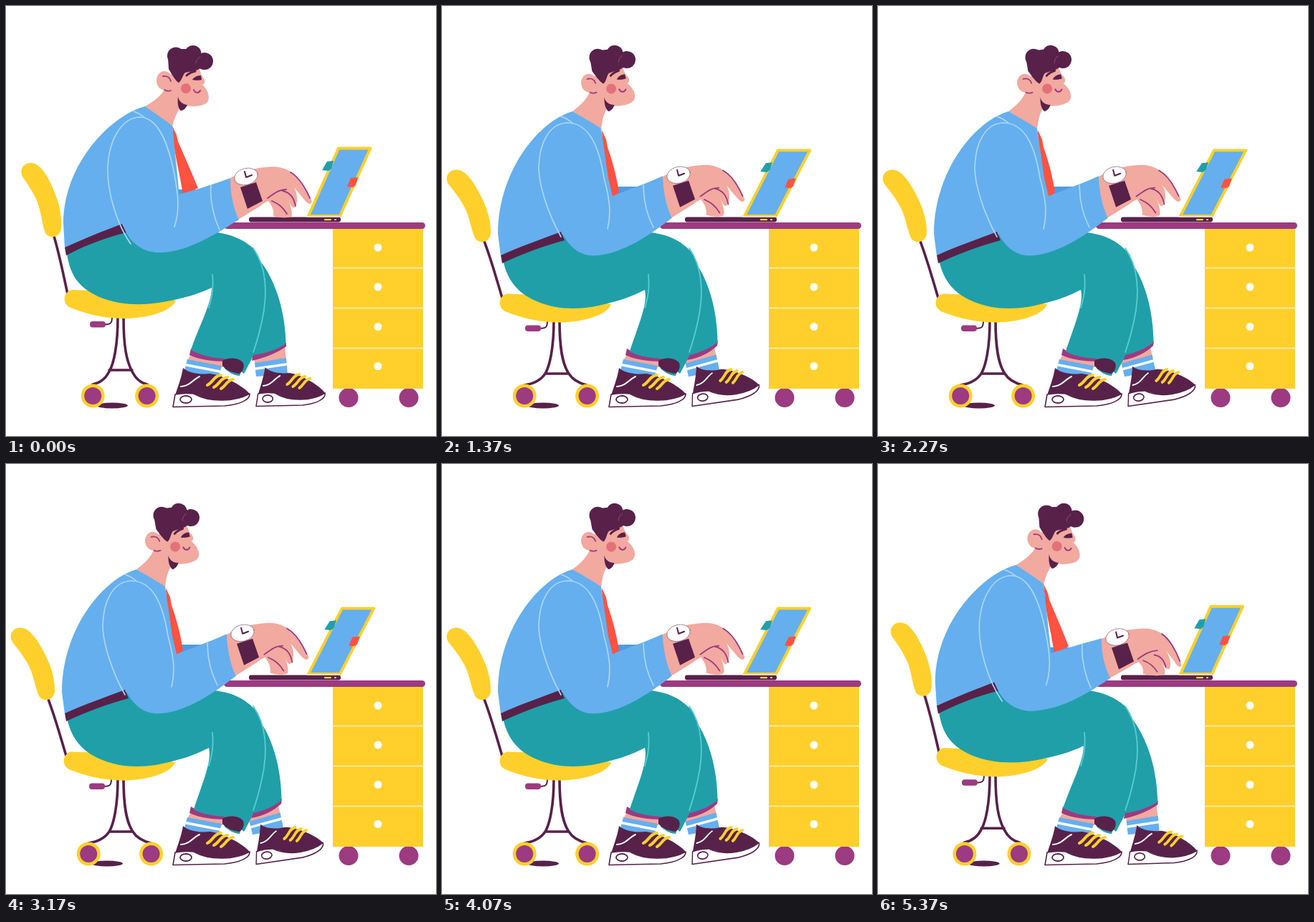
Animation, 600 px wide and 600 px high, one loop 5410 ms. Source, as an HTML page:

```html
<!DOCTYPE html>
<html lang="en">
<head>
<meta charset="utf-8">
<title>Typing at the desk</title>
<style>
html, body { margin: 0; width: 100%; height: 100%; overflow: hidden; background: #fff; }
svg { display: block; width: 100vw; height: 100vh; }
</style>
</head>
<body>
<svg id="stage" viewBox="0 0 600 600" stroke-linecap="round" stroke-linejoin="round"></svg>
<script>
const BLUE = '#65afee', TEAL = '#209fa9', YELLOW = '#ffd02b', DARK = '#58214a', PURPLE = '#9c3a82',
  SKIN = '#f2a99f', RED = '#ff5240', PALE = '#a9d5fa', MINT = '#58cdd1', WHITE = '#fff';
const LOOP = 5410, CYCLE = 27; // ms, steps of one sway
const stage = document.getElementById('stage');

const fill = (d, c, extra = '') => `<path d="${d}" fill="${c}" ${extra}/>`;
const line = (d, c, w) => `<path d="${d}" fill="none" stroke="${c}" stroke-width="${w}"/>`;
const dot = (x, y, r, c) => `<circle cx="${x}" cy="${y}" r="${r}" fill="${c}"/>`;
const oval = (x, y, rx, ry, c, extra = '') => `<ellipse cx="${x}" cy="${y}" rx="${rx}" ry="${ry}" fill="${c}" ${extra}/>`;
const bar = (x, y, w, h, r, c) => `<rect x="${x}" y="${y}" width="${w}" height="${h}" rx="${r}" fill="${c}"/>`;
const group = (transform, ...parts) => `<g transform="${transform}">${parts.join('')}</g>`;

// Blends two paths of the same structure; t may run past 0..1.
function mix(a, b, t) {
  const to = b.match(/-?[\d.]+/g);
  let i = 0;
  return a.replace(/-?[\d.]+/g, n => (+n + (to[i++] - n) * t).toFixed(2));
}

// Cosine wave peaking at step `peak`, scaled to 0 at step 0 and 1 at step `end`.
function wave(p, peak, end, turns = 1) {
  const c = s => Math.cos((s - peak) * turns * 2 * Math.PI / CYCLE);
  return (c(0) - c(p)) / (c(0) - c(end));
}

const shoe = fill('M247 505C252 510 265 515 285 513C305 516 330 530 339 540C341 546 330 552 312 553C290 553 275 546 262 541C250 541 240 542 236 543C240 531 245 518 247 505Z', DARK) +
  fill('M236 542C245 540 254 540 262 541C285 554 320 552 340 541C341 550 325 556 305 558L233 559.5Z', WHITE, `stroke="${DARK}" stroke-width="1.6"`) +
  oval(251, 549, 8, 5, WHITE, `stroke="${DARK}" stroke-width="1.8"`) +
  line('M244 531C257 530 261 521 270 517', WHITE, 2) +
  line('M300 515C290 516 289 525 281 529M309 518C299 519 298 528 290 532M317 521C308 522 307 530 300 534', YELLOW, 4);

const desk = dot(478, 546.5, 13.5, PURPLE) + dot(562, 546.5, 13.5, PURPLE) +
  bar(456, 308, 126, 226, 0, YELLOW) +
  line('M456 365.5H582M456 421.5H582M456 477.5H582', '#fdea9f', 2) +
  [337, 392, 447.5, 502.5].map(y => dot(519, y, 5.5, WHITE)).join('') +
  bar(304, 302, 281, 9, 4.5, PURPLE);

const nearFoot = fill('M260 482L310 490L302 504L253 495Z', SKIN) +
  fill('M253 493L301 502L297 516L248 512Z', BLUE) +
  line('M252 501L298 510', WHITE, 3.5) + shoe;

const head = oval(221, 104, 11, 13, SKIN) +
  fill('M228 96L268 82L273 97C279 104 278 108 274 110C282 117 286 129 280 135C272 142 254 140 242 138L222 118Z', SKIN) +
  line('M219 98C225 97 229 100 230 105M221 117C224 119 227 119 230 118', PURPLE, 1.8) +
  fill('M226 72L227 88C232 96 236 104 241 107C246 103 246 97 250 93C258 91 266 91 271 87L284 80L264 60L240 60Z', DARK) +
  dot(237, 69.5, 12, DARK) + dot(261, 66.5, 11.5, DARK) + dot(277, 77, 12, DARK) +
  line('M252 97C255 94 259 92 264 91', DARK, 3) +
  line('M271 71C267 73 265 76 265 80', '#8b4674', 1) +
  fill('M260 103C263 98 268 97 272 97L273 103C269 104 264 104 260 103Z', DARK) +
  line('M262 117C264 122 269 122 271 118', PURPLE, 2) +
  dot(251, 115, 7, '#e4717a') +
  fill('M240 126C241 133 246 137 253 138C251 143 247 146 244 146C240 143 239 135 240 126Z', DARK);

function chair(seat, lean) {
  const left = 121.2 - 6 * seat, right = 196.6 + 6 * seat;
  const legs = mix(
    'M156 434C156 475 150 500 144 510C139 520 131 526 121 528M164 434C164 475 168 495 176 510C181 520 188 526 197 528M144 508L176 508',
    'M156 439C156 478 150 503 144 513C138 522 128 527 115 529M164 439C164 478 168 500 177 513C182 521 190 526 202 529M144 513L177 513', seat);
  return oval(148 - 7 * seat, 557.5, 22, 4, DARK) +
    line(legs, DARK, 3.6) +
    [left, right].map(x => dot(x, 544, 16.5, YELLOW) + dot(x, 544, 12, PURPLE)).join('') +
    group(`translate(${-2 * lean} ${5 * lean}) rotate(${-4.3 * lean} 87 403)`,
      line('M66 318C75 348 80 375 86 402', DARK, 3.6),
      fill('M23 238C18 228 25 219 34 219C44 219 50 226 58 239C70 262 79 286 77 310C76 323 61 326 55 317C51 308 50 294 46 280C41 264 31 250 23 238Z', YELLOW)) +
    group(`translate(${-seat} ${5.5 * seat})`,
      line('M138 444C146 445 148 442 148 434', DARK, 2),
      bar(117, 440, 22, 8.5, 4, PURPLE),
      fill('M92 396C79 399 78 416 90 421C115 431 140 436 165 436C195 436 230 427 237 411L200 400Z', YELLOW));
}

function farLeg(seat) {
  return group(`rotate(${-7 * seat} 349 558)`,
      fill('M346 484L389 474L391 494L347 499Z', SKIN),
      fill('M347 498L391 491L393 514L349 517Z', BLUE),
      line('M349 506L391 500', WHITE, 3.5),
      group('translate(139.3 -1) scale(.9 1)', shoe)) +
    fill(mix('M391 470L345 484L343 495C362 491 380 483 391 475Z', 'M385 467L345 482L342 494C360 491 375 483 384 474Z', seat), PURPLE) +
    fill(mix('M300 319C342 325 388 380 390.5 471C380 479 362 485 345 487L290 400Z',
      'M300 320C342 326 383 380 384.5 469C375 477 360 484 345 487L290 400Z', seat), TEAL);
}

function nearLeg(seat) {
  return fill('M258 478C275 489 295 491 312 491L306 496C288 496 268 493 256 487Z', PURPLE) +
    fill(mix(
      'M84 338C88 375 100 392 130 406C165 420 200 418 235 410C255 406 275 399 287 393C287 415 270 445 258 480C275 489 290 491 305 492L332 513C342 495 350 480 355 460C367 425 368 375 345 338C329 324 313 319 295 316L166 306Z',
      'M84 349C90 383 105 400 132 412C165 426 200 424 235 414C255 409 270 403 283 396C288 415 272 450 262 482C275 489 290 491 305 492L332 513C342 495 350 480 355 460C367 425 368 375 347 342C329 324 313 319 291 316L170 317Z', seat), TEAL) +
    fill('M305 500L330 505L326 516C318 516 311 511 305 506Z', TEAL) +
    fill('M302 495C309 490 325 490 331 498C333 505 330 511 325 513C317 512 308 509 302 502Z', DARK) +
    line('M288 375C290 395 287 407 283 421M345 338C363 363 366 400 357 440C353 458 349 472 345 483', MINT, 1.8);
}

function torso(sway, seat) {
  const m = (a, b) => mix(a, b, sway);
  return fill(m('M236 256L300 256L300 266L236 266Z', 'M236 252L300 252L300 266L236 266Z'), '#4f9be0') +
    fill(m('M194 140C208 132 218 124 222 114L252 130C240 145 236 152 232 168Z',
      'M182 147C195 138 203 128 207 118L238 132C226 146 224 156 222 172Z'), SKIN) +
    fill(m('M232 167L238 180L240 189C250 212 258 230 268 254L247 264C243 236 237 215 234 192Z',
      'M223 173L229 186L231 197C238 217 243 235 247 260L235 269C233 240 227 220 224 200Z'), RED) +
    fill(m('M194 140C147 152 80 220 80 303L82 338C105 328 135 316 165 305L245 295L239 235L232 167C220 158 207 149 194 140Z',
      'M182 147C136 160 78 230 78 318L82 349C110 337 140 326 170 316L245 295L232 240L222 171C210 163 196 155 182 147Z'), BLUE) +
    fill(mix('M82 337C110 324 138 313 162 304L168 316C140 323 110 334 84 348Z',
      'M82 348C110 335 140 325 166 315L171 327C140 335 110 347 84 359Z', seat), DARK) +
    line(m('M178 147C184 149 189 152 194 156', 'M166 154C172 156 177 159 182 163'), PALE, 1.6);
}

function arm(sway, tap) {
  // Tapping drops the wrist end of the sleeve.
  const sleeve = mix(
    'M160 200L164 308C174 334 195 345 217 344C255 342 290 320 325 298C318 285 313 264 313 240C290 249 262 257 239 264L230 200Z',
    'M150 210L167 316C180 340 195 348 213 348C250 347 290 320 321 296C314 282 309 262 308 238C285 248 258 257 234 267L218 200Z', sway);
  const dropped = mix(sleeve,
    'M160 200L164 308C174 334 195 346 217 345C255 343 290 325 324 300C316 287 310 268 311 248C290 250 262 258 237 266L230 200Z', tap * .9);
  const cuff = mix('M286 250C284 270 290 295 298 312', 'M281 250C281 270 286 292 295 309', sway);
  const seam = mix(
    'M174 332C155 305 142 262 142 230C142 190 160 155 188 155C214 157 227 195 235 235C240 262 243 285 235 308',
    'M166 322C148 290 135 250 135 225C136 190 150 163 176 163C205 164 219 195 226 240C233 265 237 288 231 311', sway);
  return fill(dropped, BLUE) + line(seam, PALE, 1.7) + group(`translate(${-tap} ${2 * tap})`, line(cuff, PALE, 1.7));
}

function hand(sway, tap) {
  const palm = mix(
    'M313 240C330 232 345 226 362 225C385 222 400 230 409 243C417 254 424 264 427 273C425 278 421 276 416 270L402 253C407 262 408 275 403 281C399 284 396 275 391 265C396 275 401 288 398 294C388 297 377 294 373 293C374 285 372 280 366 272C362 274 358 276 355 279L324 298L305 255Z',
    'M311 249C328 242 345 236 360 236C382 233 398 240 406 253C414 266 420 280 421 290C418 293 414 290 412 282L400 265C407 272 413 284 412 291C408 293 402 290 395 281C400 284 404 288 403 293C390 297 375 295 367 293C368 289 368 286 362 281C361 281 358 282 355 284L324 300L303 262Z', tap);
  const creases = mix(
    'M397 232C408 238 418 254 424 268M365 268C374 262 380 256 391 256M386 258C396 260 402 268 404 279M371 272C380 276 386 280 392 290',
    'M396 243C405 250 414 266 419 283M361 277C370 270 380 266 389 265M386 276C392 276 397 280 400 288M370 277C378 279 384 284 388 290', tap);
  return group(`translate(${-5 * sway} ${-1.5 * sway})`,
    fill(palm, SKIN), line(creases, PURPLE, 1.8),
    group(`translate(${-tap} ${7.5 * tap})`,
      fill('M327 253L349 246L358 272L337 283Z', DARK),
      oval(335, 238, 16.5, 11.5, WHITE, `stroke="${DARK}" stroke-width=".5" transform="rotate(-14 335 238)"`),
      line('M333 231L335 239L343 236', DARK, 2)));
}

function laptop(t) {
  return group(`translate(0 293) skewX(${-3 * t}) scale(1 ${1 - .03 * t}) translate(0 -293)`,
      fill('M422 293L464 198.5H508.5L466 293Z', BLUE, `stroke="${YELLOW}" stroke-width="4"`),
      fill('M448 217L457 216L454 227L450 230L441 229Z', TEAL),
      fill('M481 240L491 239L488 250L484 253L476 252Z', RED)) +
    bar(339, 294.5, 128, 7, 3, DARK) +
    line('M420 294H466', '#f5e9f1', 1.4) +
    line('M445 298.2H453M459 298.2H460', YELLOW, 2.2);
}

function draw(ms) {
  const p = Math.min(161, Math.floor(ms % LOOP * .03 + .2)) % CYCLE;
  const seat = wave(p, 1.5, 14), lean = wave(p, 5, 14), sway = wave(p, 2.7, 14), tap = wave(p, .6, 25, 4);
  stage.innerHTML = chair(seat, lean) + farLeg(seat) + nearFoot + nearLeg(seat) + desk + laptop(sway) +
    torso(sway, seat) +
    group(`translate(${-11 * sway} ${4 * seat}) rotate(${-6 * sway} 215 150)`, head) +
    hand(sway, tap) + arm(sway, tap);
}

const start = performance.now();
function tick() {
  draw(performance.now() - start);
  requestAnimationFrame(tick);
}
tick();
</script>
</body>
</html>
```
